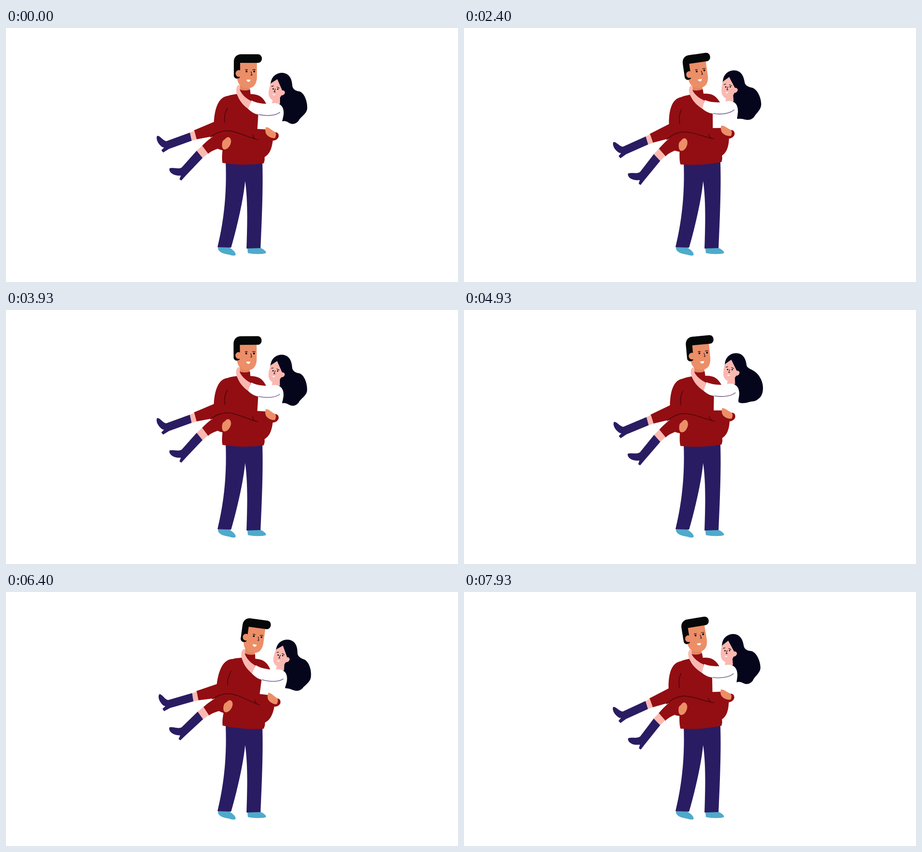
Recreate the animation shown at these times as an HTML page. Size 998 by 561 pixels, loop 8 s.

```html
<!DOCTYPE html>
<html lang="en">
<head>
<meta charset="utf-8">
<title>Couple swaying</title>
<style>
  html, body { margin: 0; width: 100%; height: 100%; overflow: hidden; background: #fff; }
  svg { display: block; width: 100%; height: 100%; }
  .red { fill: #920e12; }
  .navy { fill: #2a1c62; }
  .tan { fill: #ec8e67; }
  .pink { fill: #fbb8b0; }
  .white { fill: #fff; }
  .line { fill: none; stroke: #56060b; stroke-width: 1.8; stroke-linecap: round; }
  .face { fill: none; stroke: #21121a; stroke-width: 1.3; }
</style>
</head>
<body>
<svg viewBox="0 0 998 561">
  <!-- standing legs -->
  <g fill="#4faacb">
    <path d="M468 484H492C500 489 507 495 507 500C507 504 500 503 494 501C485 499 467 497 468 484Z"/>
    <path d="M533 486L560 485C568 488 575 493 574 497C570 500 545 500 534 497Z"/>
  </g>
  <path class="navy" d="M485 294H566C568 350 565 420 562 486L531 487C533 430 534 380 528 338C524 380 510 440 497 485L467 484C480 430 488 370 485 294Z"/>

  <g id="body">
    <path id="hair" fill="#05061c"/>

    <!-- man -->
    <path fill="#e28660" d="M517 120H537L539 138Q527 142 515 138Z"/>
    <g id="head">
      <path class="tan" d="M515 75H554V110C553 126 545 133 533 133C520 133 511 125 510 108Z"/>
      <path fill="#050708" d="M503 106V75C503 63 511 58 519 58H556C568 58 568 77 556 77H517V95L516 110Q506 115 503 106Z"/>
      <ellipse class="tan" cx="514" cy="100.500" rx="7" ry="7.500"/>
      <circle cx="531" cy="96" r="2"/><circle cx="548" cy="96" r="2"/>
      <path class="face" d="M528 92.500Q531 91 534 92.500M544 92.500Q548 91 551 92.500M541 96L543 104H540"/>
      <path class="white" d="M531 114H540Q539 119 535.500 119Q531 118 531 114Z"/>
    </g>
    <path class="red" d="M516 136Q528 140 539 136L540 146C558 146 567 152 575 168L590 240C588 265 583 278 571 285V292L569 299Q524 305 478 298Q476 290 478 270Q466 268 464 262L455 230L459 208C461 175 470 152 490 150C500 146 510 147 516 144Z"/>
    <path class="line" d="M489 177Q481 190 483 208"/>

    <!-- legs being carried -->
    <path class="red" d="M460 207L415 226L420 246L452 240H500Z"/>
    <path class="pink" d="M406 231L416 227L421 246L410 249Z"/>
    <path class="navy" d="M406 231L354 250C345 248 341 238 334 238C330 244 335 256 345 263L349 264L343 270L347 275L360 267L410 249Z"/>
    <path class="red" d="M490 227C470 228 450 243 433 260L446 278C455 270 465 268 480 262L520 245Z"/>
    <path class="pink" d="M433 260L446 277L434 287L421 271Z"/>
    <path class="navy" d="M421 271L388 308C380 313 370 307 361 310C359 317 367 325 380 326H386L383 334L387 337L397 326L434 287Z"/>
    <path class="line" d="M452 241Q470 226 493 227C515 230 530 240 556 247M545 236Q545 241 549 244"/>
    <path class="tan" d="M479 249C484 246 486 241 491 241C498 243 498 252 495 258C491 266 486 269 481 268C476 266 476 255 479 249Z"/>

    <!-- woman -->
    <path class="pink" d="M590 152L605 148V167Q597 171 587 167Z"/>
    <path class="pink" d="M585 122L599 113L610 138Q614 137 616 142Q615 149 608 149Q604 158 592 160Q583 159 580 148Q579 135 585 122Z"/>
    <circle cx="590" cy="134.500" r="1.500"/><circle cx="600" cy="135" r="1.500"/>
    <path class="face" d="M586 129L591 128M598 130L604 133M595 134L592 141H595"/>
    <path class="white" d="M588 146L595 147Q591 151 588 146Z"/>
    <path class="white" d="M534 178L542 160C555 167 575 169 590 166C608 165 614 176 613 190C611 205 605 222 599 234L574 224L555 223L557 191C548 190 540 184 534 178Z"/>
    <path fill="none" stroke="#85729f" stroke-width="1.800" d="M558 191C575 195 595 194 605 186"/>
    <path class="pink" d="M513 126C507 130 507 142 512 151C517 164 527 173 535 179L541 161C532 157 520 147 516 136C518 130 517 126 513 126Z"/>
    <path class="red" d="M595 230Q603 231 602 240Q600 247 590 249L582 240Z"/>
    <path class="tan" d="M574 219C581 219 585 225 593 229C597 232 597 237 594 243C588 244 580 241 575 235C572 230 572 223 574 219Z"/>
  </g>
</svg>
<script>
const LOOP = 8000, STEP = 1000 / 15;
const SWAY_CYCLE = 5630, SWAY_DEGREES = 5, HAIR_CYCLE = 2000;
// [time, lean]: -1 is fully left, 1 fully right
const SWAY = [[0, 0], [1130, 1], [2160, -1], [3380, 1], [4470, -1], [5440, 0], [SWAY_CYCLE, 0]];

const HAIR_TOP = "M584 128C584 106 598 99 610 99C626 100 631 113 632 125";
const HAIR_BUMPY = [632, 134, 638, 139, 648, 140, 660, 144, 666, 165, 665, 178,
  664, 190, 650, 196, 646, 205, 638, 214, 630, 213, 624, 209, 618, 205, 614, 205, 610, 206];
const HAIR_SMOOTH = [632, 134, 641, 134, 650, 142, 662, 152, 667, 168, 666, 180,
  665, 192, 661, 199, 654, 203, 647, 209, 640, 206, 632, 209, 624, 211, 617, 211, 611, 208];

const body = document.getElementById("body");
const head = document.getElementById("head");
const hair = document.getElementById("hair");

const mix = (a, b, k) => a + (b - a) * k;
const ease = k => (1 - Math.cos(Math.PI * k)) / 2;

function swayAt(time) {
  const t = time % SWAY_CYCLE;
  const i = SWAY.findIndex(key => key[0] > t);
  const [t0, v0] = SWAY[i - 1], [t1, v1] = SWAY[i];
  return mix(v0, v1, ease((t - t0) / (t1 - t0)));
}

function draw(now) {
  const time = Math.floor((now % LOOP + 5) / STEP) * STEP;
  const angle = SWAY_DEGREES * swayAt(time);
  body.setAttribute("transform", `rotate(${angle} 524 301)`);
  head.setAttribute("transform", `rotate(${angle} 526 133)`);

  const wave = ease(2 * (time - 50) / HAIR_CYCLE);
  const curl = HAIR_BUMPY.map((v, i) => mix(v, HAIR_SMOOTH[i], wave));
  hair.setAttribute("d", `${HAIR_TOP}C${curl.join(" ")}L603 165Z`);
  requestAnimationFrame(draw);
}
const start = performance.now();
draw(0);
function tick() { return performance.now() - start; }
</script>
</body>
</html>
```
